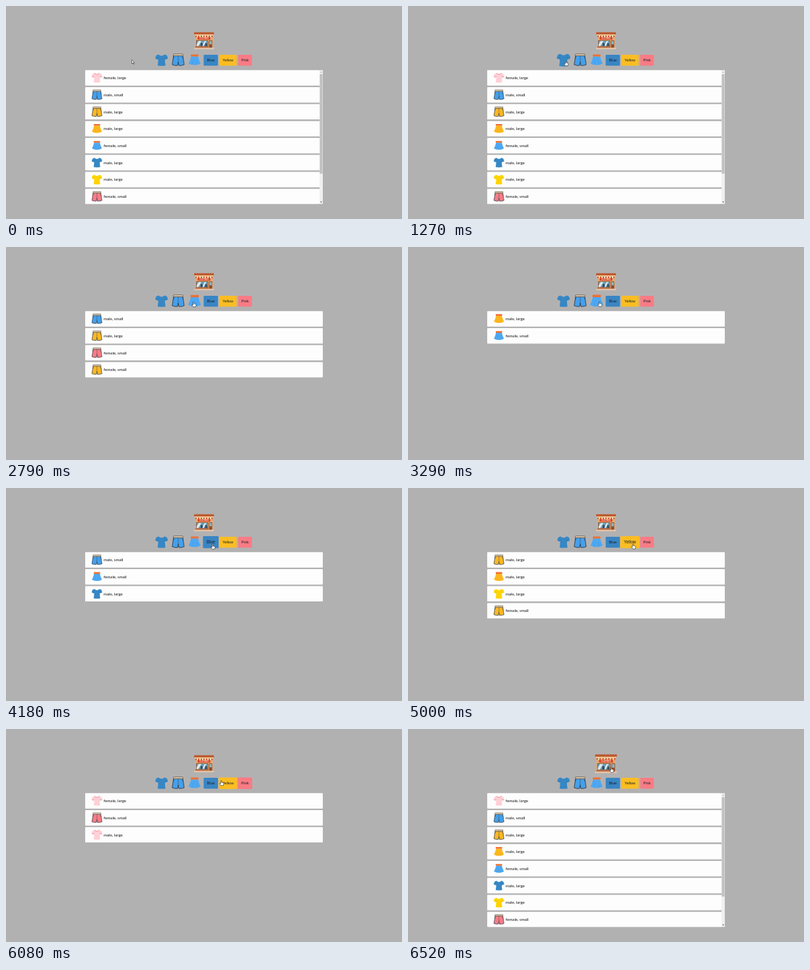
An HTML page that plays this animation: 600x323 px, repeating every 7.28 s.

```html
<!DOCTYPE html>
<html lang="en">
<head>
<meta charset="utf-8">
<title>Clothes filter</title>
<style>
html, body { margin: 0; width: 100%; height: 100%; overflow: hidden; background: #b2b1b2; }
svg { display: block; width: 100%; height: 100%; }
.row { font: 6.15px Lato, sans-serif; fill: #111; }
.btn { font: 5.8px "Liberation Sans", Arial, sans-serif; fill: #14202b; text-anchor: middle; }
.sign { font: bold 2.9px "Liberation Sans", Arial, sans-serif; fill: #ffe9cf; text-anchor: middle; }
</style>
</head>
<body>
<svg id="stage" viewBox="0 0 600 323"></svg>
<script>
const LOOP = 7280, TICK = LOOP / 115;
const PITCH = 25.7, TOP = 97.3, ROW_H = 23.4;

const SHIRT = "M-4.6 -8.6Q0 -4.6 4.6 -8.6L7.6 -7.6Q9.4 -5.6 9.5 -2.2L6 -.8L5.2 -1.6Q4.9 3 6 8.2Q0 9.4 -6 8.2Q-4.9 3 -5.2 -1.6L-6 -.8L-9.5 -2.2Q-9.4 -5.6 -7.6 -7.6Z";
const SHORTS = "M-7 -6.6H7L9.1 7.2Q5 8.9 1 8.4L0 3L-1 8.4Q-5 8.9 -9.1 7.2Z";
const SKIRT = "M-5.2 -5.6H5.2Q6.8 1 9.2 5.2Q5 7.8 0 7.6Q-5 7.8 -9.2 5.2Q-6.8 1 -5.2 -5.6Z";

const TINT = {
  shirt: { blue: "#3687c4", yellow: "#ffd400", pink: "#ffd0d6" },
  shorts: { blue: "#459fea", yellow: "#fbb724", pink: "#f97c86" },
  skirt: { blue: "#4da8f3", yellow: "#fdb81e" }
};

const draw = {
  shirt(color) {
    const fill = TINT.shirt[color];
    const trim = color === "pink"
      ? `<path d="M-4.6 -8.6Q0 -4.6 4.6 -8.6M-9.4 -2.4L-6 -1M9.4 -2.4L6 -1" fill="none" stroke="#e8808a" stroke-width="1"/>` : "";
    return `<path d="${SHIRT}" fill="${fill}"/>
      <path d="M-5.2 -1.6L-5.6 -4M5.2 -1.6L5.6 -4" stroke="#000" stroke-opacity=".22" stroke-width=".6"/>${trim}`;
  },
  shorts(color) {
    return `<path d="${SHORTS}" fill="${TINT.shorts[color]}" stroke="#2d3a48" stroke-width=".9" stroke-linejoin="round"/>
      <rect x="-7.3" y="-9" width="14.6" height="2.6" rx=".5" fill="#e9d3b0" stroke="#4a4038" stroke-width=".7"/>
      <path d="M0 -6.4V3M-6.2 -6Q-6 -3 -8 -1.6M6.2 -6Q6 -3 8 -1.6" fill="none" stroke="#2d3a48" stroke-width=".5"/>`;
  },
  skirt(color) {
    return `<path d="${SKIRT}" fill="${TINT.skirt[color]}"/>
      <path d="M-2.4 0L-3.6 7M2.4 0L3.6 7" stroke="#000" stroke-opacity=".1" stroke-width=".6"/>
      <rect x="-5.8" y="-8.6" width="11.6" height="3.2" rx=".6" fill="#ef7031"/>`;
  }
};

const box = (x, y, w, h, fill, extra = "") =>
  `<rect x="${x}" y="${y}" width="${w}" height="${h}" fill="${fill}" ${extra}/>`;

const button = (w, color, label) =>
  box(-w / 2, -8.3, w, 16.6, color, 'rx="1.2"') + `<text class="btn" y="2">${label}</text>`;

function shop() {
  let awning = "";
  for (let i = 0; i < 13; i++) awning += box(-13 + i * 2, -7.6, 2, 2.2, i % 2 ? "#f6dfbd" : "#cf5a33");
  return box(-13.4, -9, 26.8, 21, "#e5aa70")
    + box(-15, -12.8, 30, 3.6, "#bd5a30", 'rx=".5"')
    + box(-14.2, -9.4, 28.4, 1.6, "#f3cd98")
    + awning
    + box(-9.6, -5.4, 19.2, 4, "#d6452b", 'rx=".5"')
    + `<text class="sign" y="-2.4">CLOTHES</text>`
    + box(-12, -.4, 18.4, 9.4, "#7a4a32")
    + box(-11.2, .4, 16.8, 7.8, "#6fa3bd")
    + `<path d="M-8 .4H-4L-8.6 8.2H-11.2V6ZM1 .4H3.6L-.8 8.2H-3Z" fill="#dcebef"/>
       <path d="M-5.2 8.2V4.4L-3.6 3L-2 4.4V8.2ZM1.4 8.2L2.4 3.6H4L5 8.2Z" fill="#394858"/>`
    + box(7.6, -.4, 4.8, 12, "#8a4f31") + box(8.4, .6, 3.2, 5, "#93b7c2")
    + box(-15, 10.8, 30, 2.2, "#e9c7ac", 'rx=".4"') + box(-13.4, 9, 20.4, 1.8, "#b8673c");
}

// Hover targets: centre, half size, picture
const targets = [
  [300, 52.5, 15, 13, shop()],
  [235.7, 82, 9.5, 9, draw.shirt("blue")],
  [260.9, 81.8, 9.5, 9, draw.shorts("blue")],
  [285.8, 82, 9.5, 8.5, draw.skirt("blue")],
  [310.3, 82.2, 10.8, 8.3, button(21.6, "#3985c3", "Blue")],
  [336.2, 82.2, 13.3, 8.3, button(26.6, "#fbbd22", "Yellow")],
  [362.2, 82.2, 10.3, 8.3, button(20.6, "#f97b84", "Pink")]
];

const items = [
  ["shirt", "pink", "female, large"],
  ["shorts", "blue", "male, small"],
  ["shorts", "yellow", "male, large"],
  ["skirt", "yellow", "male, large"],
  ["skirt", "blue", "female, small"],
  ["shirt", "blue", "male, large"],
  ["shirt", "yellow", "male, large"],
  ["shorts", "pink", "female, small"],
  ["shirt", "pink", "male, large"],
  ["shorts", "yellow", "female, small"]
];

// Tick of each click and the filter it sets
const clicks = [[0, ""], [23, "shirt"], [37, "shorts"], [52, "skirt"],
  [66, "blue"], [79, "yellow"], [91, "pink"], [103, ""]];

// Pointer moves: start tick, end tick, destination
const start = [190.6, 81.6];
const moves = [
  [0, 11, 220, 84.5], [12, 20, 239, 83], [23, 33, 263, 85], [37, 47, 290, 82.5],
  [58, 65, 313, 85], [68, 74, 341, 84.5], [81, 88, 363, 88], [93, 96, 326, 78], [96, 102, 308, 58]
];

function pointer(tick) {
  let [x, y] = start;
  for (const [from, to, nx, ny] of moves) {
    if (tick <= from) break;
    const p = Math.min(1, (tick - from) / (to - from)), e = p * p * (3 - 2 * p);
    x += (nx - x) * e;
    y += (ny - y) * e;
  }
  return [x, y];
}

function inside([x, y], [cx, cy, w, h]) {
  return Math.abs(x - cx) <= w && Math.abs(y - cy) <= h;
}

// Hover growth eases in and out over four ticks
function growth(target, tick) {
  let n = 0;
  for (let k = 0; k < 4; k++) n += inside(pointer(Math.max(0, tick - k)), target);
  return 1 + 0.1 * n / 4;
}

function list(filter) {
  const shown = items.filter(item => !filter || item.includes(filter)).slice(0, 8);
  const width = filter ? 360 : 355;
  let out = shown.map(([kind, color, label], i) => {
    const y = TOP + i * PITCH, mid = y + ROW_H / 2;
    return box(120, y, width, Math.min(ROW_H, 300.2 - y), "#fdfdfd", 'rx=".9"')
      + `<g transform="translate(137.8 ${mid}) scale(.83)">${draw[kind](color)}</g>`
      + `<text class="row" x="148" y="${mid + 2.1}">${label}</text>`;
  }).join("");
  if (!filter) out += box(475, 97.3, 5, 202.9, "#f0f0f0") + box(475.5, 103.2, 4, 151, "#c0c0c0")
    + `<path d="M476.2 101L477.5 99.4L478.8 101Z" fill="#999"/><path d="M476.2 296.6L477.5 298.2L478.8 296.6Z" fill="#444"/>`;
  return out;
}

const ARROW = `<path d="M0 0V5.8L1.4 4.6L2.4 6.8L3.3 6.4L2.4 4.3H4.1Z" fill="#fff" stroke="#222" stroke-width=".6" stroke-linejoin="round"/>`;
const HAND = `<path d="M-.7 .5Q0 -.5 .7 .5V2.9L3.2 3.5Q4 3.8 3.9 4.8L3.2 7.8H-.5L-2.4 5Q-2.5 4 -1.5 4.2L-.7 4.9Z" fill="#fff" stroke="#222" stroke-width=".6" stroke-linejoin="round"/>`;

const stage = document.getElementById("stage");
stage.innerHTML = `<g id="list"></g>`
  + targets.map(t => `<g class="target">${t[4]}</g>`).join("")
  + `<g id="pointer"></g>`;
const listEl = document.getElementById("list");
const pointerEl = document.getElementById("pointer");
const targetEls = [...document.querySelectorAll(".target")];
let lastTick = -1, lastFilter = null;

function render(time) {
  const tick = Math.floor((time % LOOP + 4) / TICK) % 115;
  if (tick === lastTick) return;
  lastTick = tick;

  const filter = clicks.filter(c => c[0] <= tick).pop()[1];
  if (filter !== lastFilter) listEl.innerHTML = list(lastFilter = filter);

  targets.forEach((t, i) =>
    targetEls[i].setAttribute("transform", `translate(${t[0]} ${t[1]}) scale(${growth(t, tick)})`));

  const pos = pointer(tick);
  pointerEl.innerHTML = targets.some(t => inside(pos, t)) ? HAND : ARROW;
  pointerEl.setAttribute("transform", `translate(${pos})`);
}

const began = performance.now();
function frame() {
  render(performance.now() - began);
  requestAnimationFrame(frame);
}
frame();
</script>
</body>
</html>
```
